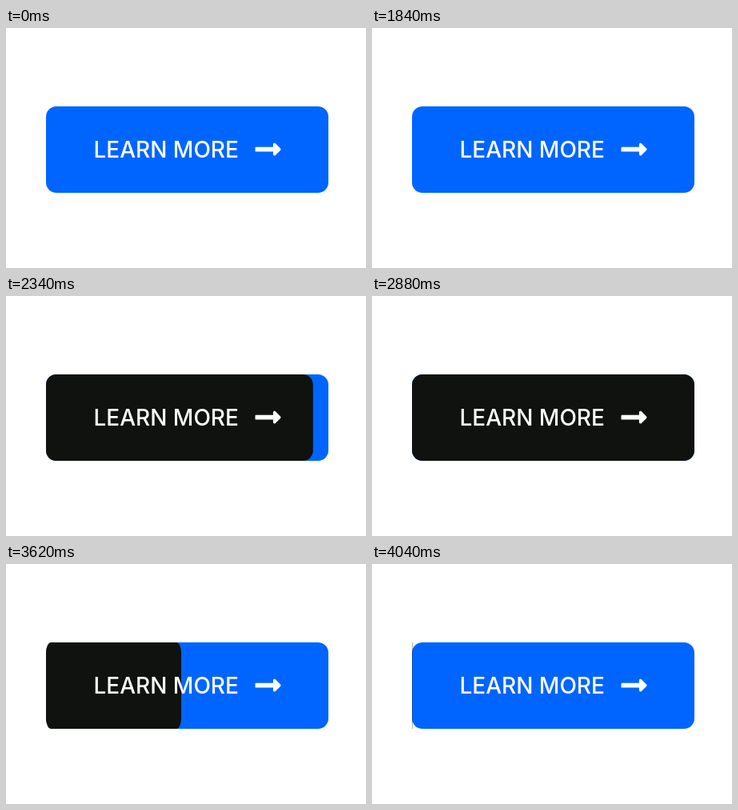
Recreate the animation shown at these times as an HTML page. Size 450 px wide and 300 px high, loop 4700 ms.

```html
<!DOCTYPE html>
<html lang="en">
<head>
<meta charset="utf-8">
<title>Button hover</title>
<style>
  html, body { margin: 0; width: 100%; height: 100%; overflow: hidden; background: #fff; }
  svg { display: block; width: 450px; height: 300px; }
  text { font: 500 28px Inter, sans-serif; }
</style>
</head>
<body>
<svg viewBox="0 0 450 300">
  <rect x="50" y="98" width="353" height="108" rx="13" fill="#0065ff"/>
  <g transform="translate(50 98)">
    <rect id="cover" width="353" height="108" rx="13" fill="#10120f"/>
  </g>
  <g fill="#fff">
    <text x="109.5" y="162">LEARN MORE</text>
    <path transform="translate(311.5 151.7)" d="M22.4-2.85H.85Q0-2.85 0-2V2Q0 2.85.85 2.85H22.4V6.15c0 1.53 1.85 2.29 2.93 1.21l6.15-6.15c.67-.67.67-1.75 0-2.42l-6.15-6.15c-1.08-1.08-2.93-.32-2.93 1.21z"/>
  </g>
</svg>
<script>
const LOOP = 4700, ENTER = 1840, LEAVE = 3370, DURATION = 700;
const cover = document.getElementById('cover');

// cubic-bezier(.4, 0, .2, 1), solved by bisection
function ease(x) {
  if (x <= 0) return 0;
  if (x >= 1) return 1;
  let lo = 0, hi = 1, s;
  for (let i = 0; i < 24; i++) {
    s = (lo + hi) / 2;
    const r = 1 - s;
    if (1.2 * s * r * r + 0.6 * s * s * r + s ** 3 < x) lo = s;
    else hi = s;
  }
  return s * s * (3 - 2 * s);
}

const progress = (t, start) => ease((t - start) / DURATION);

function draw(now) {
  const t = now % LOOP;
  const scale = progress(t, ENTER) - progress(t, LEAVE);
  cover.setAttribute('transform', `scale(${scale.toFixed(5)} 1)`);
  cover.setAttribute('visibility', scale > 0.0005 ? 'visible' : 'hidden');
}

const begin = performance.now();
function tick() {
  draw(performance.now() - begin);
  requestAnimationFrame(tick);
}
tick();
</script>
</body>
</html>
```
